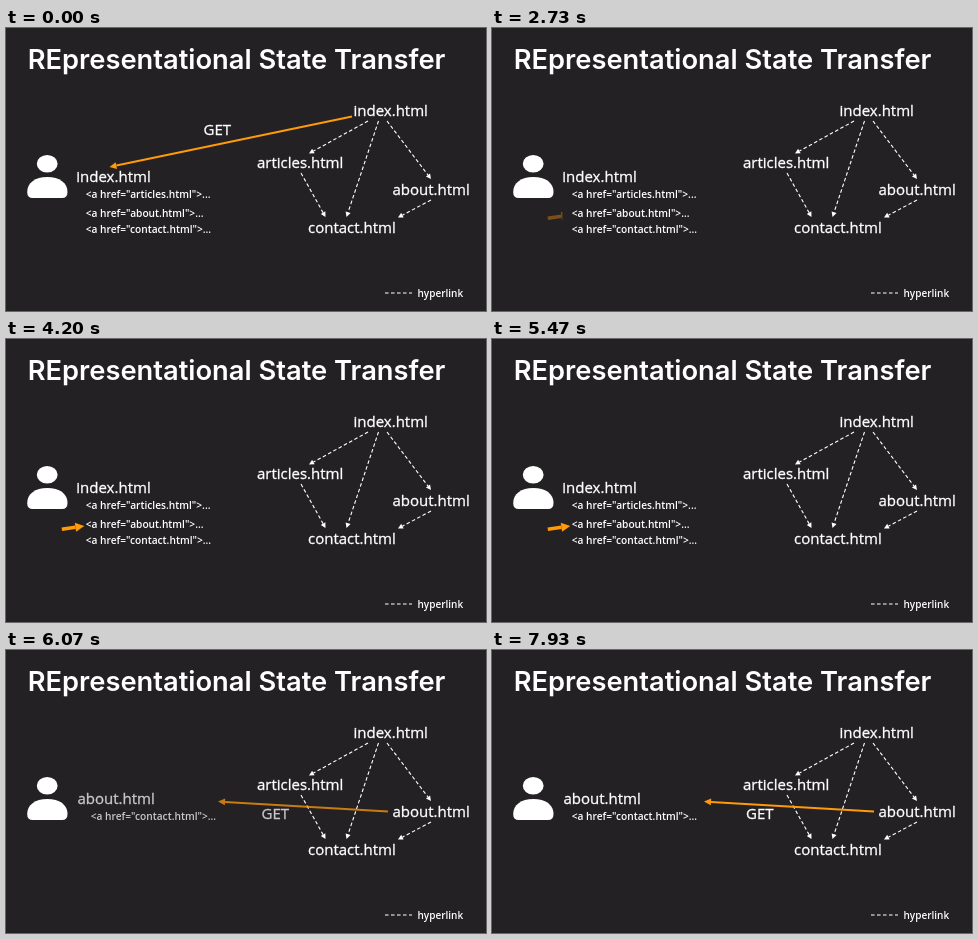
These frames come from a looping animation (480x283 px, 8 s). An HTML page:

```html
<!DOCTYPE html>
<html lang="en">
<head>
<meta charset="utf-8">
<title>REpresentational State Transfer</title>
<style>
  html, body { margin: 0; width: 100%; height: 100%; overflow: hidden; background: #232124; }
  svg { display: block; width: 100%; height: 100%; }
  text { font: 15px "Open Sans", "Noto Sans", sans-serif; fill: #fff; stroke: #fff; stroke-width: .3; white-space: pre; }
  .title { font: 600 27.3px Inter, sans-serif; stroke: none; }
  .code, .legend { font-size: 10.2px; font-weight: 600; stroke: none; }
  .legend { font-size: 10px; }
  .dash { stroke: #fff; stroke-width: 1.1; stroke-dasharray: 3.6 2.4; }
</style>
</head>
<body>
<svg id="stage" viewBox="0 0 480 283">
  <clipPath id="wipe"><rect id="wipeBox" x="54" y="180" height="16"/></clipPath>
  <text class="title" x="21.7" y="41">REpresentational State Transfer</text>
  <g fill="#fff">
    <ellipse cx="41.2" cy="135.8" rx="10.4" ry="8.8"/>
    <path d="M21.2 164C21.2 155 29 149 41.3 149S61.5 155 61.5 164Q61.5 170 56 170H26.7Q21.2 170 21.2 164Z"/>
  </g>
  <g id="site"></g>
  <g id="firstPage"></g>
  <g id="firstRequest"></g>
  <g id="pointer" clip-path="url(#wipe)"></g>
  <g id="secondPage"></g>
  <g id="secondRequest"></g>
</svg>
<script>
const LOOP = 8000;
const ORANGE = '#ff9a0a';
const byId = id => document.getElementById(id);

function add(parent, tag, attrs, content = '') {
  const node = document.createElementNS('http://www.w3.org/2000/svg', tag);
  for (const key in attrs) node.setAttribute(key, attrs[key]);
  node.textContent = content;
  return parent.appendChild(node);
}

const label = (parent, x, y, content, cls = '') =>
  add(parent, 'text', { x, y, class: cls }, content);

// A line ending in a triangular head whose tip is at (x2, y2)
function arrow(parent, [x1, y1, x2, y2], { head, half, ...style }) {
  const length = Math.hypot(x2 - x1, y2 - y1);
  const ux = (x2 - x1) / length, uy = (y2 - y1) / length;
  const bx = x2 - ux * head, by = y2 - uy * head;
  add(parent, 'line', { x1, y1, x2: bx, y2: by, ...style });
  add(parent, 'polygon', {
    points: `${x2},${y2} ${bx - uy * half},${by + ux * half} ${bx + uy * half},${by - ux * half}`,
    fill: style.stroke || '#fff'
  });
}

const link = page => `<a href="${page}.html">...`;
const requestStyle = { head: 7, half: 3.4, stroke: ORANGE, 'stroke-width': 2 };

const site = byId('site');
label(site, 347.5, 88, 'index.html');
label(site, 251, 140, 'articles.html');
label(site, 386.5, 167, 'about.html');
label(site, 302, 205, 'contact.html');
for (const ends of [
  [362, 93, 303, 125.5],
  [372.5, 93, 340.5, 189],
  [381, 93, 425, 151],
  [295, 145, 319.5, 189],
  [425, 172, 392, 189.5]
]) arrow(site, ends, { head: 5, half: 2.6, class: 'dash' });
add(site, 'line', { x1: 379, y1: 265, x2: 406, y2: 265, class: 'dash' });
label(site, 411.5, 268.5, 'hyperlink', 'legend');

const firstPage = byId('firstPage');
label(firstPage, 70.3, 154, 'index.html');
label(firstPage, 79.7, 170, link('articles'), 'code');
label(firstPage, 79.7, 188.5, link('about'), 'code');
label(firstPage, 79.7, 205, link('contact'), 'code');

const firstRequest = byId('firstRequest');
arrow(firstRequest, [346, 88.5, 103.5, 139], requestStyle);
label(firstRequest, 197.5, 107, 'GET');

const pointer = byId('pointer');
arrow(pointer, [55.8, 190.2, 78.3, 187], { head: 9, half: 4.5, stroke: ORANGE, 'stroke-width': 3.5 });

const secondPage = byId('secondPage');
label(secondPage, 71.5, 154, 'about.html');
const contactLink = label(secondPage, 79.7, 170, link('contact'), 'code');

const secondRequest = byId('secondRequest');
arrow(secondRequest, [382, 161.5, 212, 151.5], requestStyle);
const secondGet = label(secondRequest, 254, 169, 'GET');

const progress = (t, from, to) => Math.min(1, Math.max(0, (t - from) / (to - from)));
const fade = (node, opacity) => node.setAttribute('opacity', opacity);

function draw(t) {
  const leaving = 1 - progress(t, 5670, 5820);
  const arriving = progress(t, 5830, 6150);
  const slide = (1 - progress(t, 5850, 6530)) ** 2;
  const pointing = Math.min(progress(t, 2600, 2930), leaving);

  fade(firstRequest, 1 - progress(t, 2250, 2500));
  fade(pointer, pointing);
  byId('wipeBox').setAttribute('width', 26 * Math.sqrt(pointing));
  fade(firstPage, leaving);
  fade(secondPage, arriving);
  fade(secondRequest, arriving);
  contactLink.setAttribute('x', 79.7 + 11 * slide);
  secondGet.setAttribute('x', 254 + 3.5 * slide);
}

function tick() {
  draw(performance.now() % LOOP);
  requestAnimationFrame(tick);
}
tick();
</script>
</body>
</html>
```
